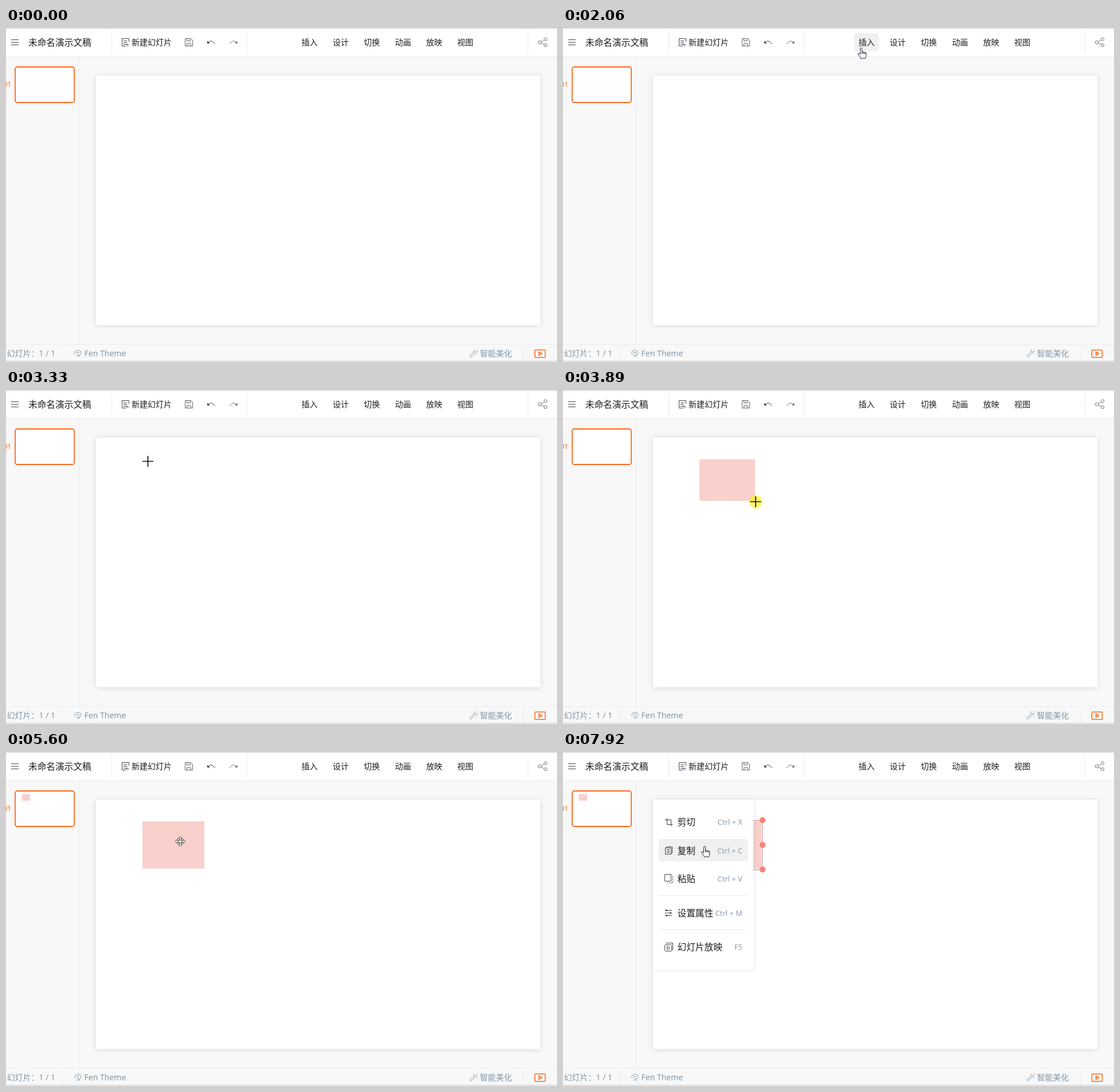
These frames come from a looping animation (961 px wide and 583 px high, 8000 ms). An HTML page:

```html
<!DOCTYPE html>
<html lang="zh-CN">
<head>
<meta charset="utf-8">
<title>演示文稿</title>
<style>
html, body { margin: 0; width: 100%; height: 100%; overflow: hidden; background: #f8f8f8; }
svg { display: block; width: 961px; height: 583px; }
text { font-family: "Noto Sans", "Noto Sans CJK SC", "Noto Sans CJK", sans-serif; font-size: 14px; fill: #1c1c1c; white-space: pre; }
.big { font-size: 15.7px; }
.key { font-size: 13px; fill: #8a9cae; text-anchor: end; }
.foot text { fill: #8297a8; }
.ico { fill: none; stroke: #444; }
.pale { stroke: #8c8c8c; }
.foot .ico { stroke: #8297a8; }
.orange { fill: none; stroke: #f9691c; stroke-width: 1.5; }
.thick { stroke-width: 2; }
.line { stroke: #ececec; fill: none; }
.card { fill: #fff; filter: drop-shadow(0 1px 5px rgba(0,0,0,.12)); }
.card.low { filter: drop-shadow(3px 3px 4px rgba(0,0,0,.06)); }
.hover { fill: #f0f0f0; }
.pink { fill: #f9d0cb; }
</style>
</head>
<body>
<svg viewBox="0 0 961 583">
  <defs>
    <g id="bend"><path d="M1 4Q7-3.500 13.500 6"/><path d="M0 .5V5H4.500Z" fill="#333" stroke="none"/></g>
    <path id="blade" d="M-1.300-1.300V-5H-3.500L0-8.500L3.500-5H1.300V-1.300"/>
  </defs>
  <rect width="961" height="49" fill="#fff"/>
  <path class="line" d="M0 49.500H961M127.500 50V552M0 552.500H961M184.500 5V45M420.500 5V45M910.500 5V45M97.500 556V580M902.500 556V580"/>
  <path d="M0 .5H961M0 581.500H961" stroke="#cfcfcf"/>

  <rect id="hoverNew" class="hover" x="193" y="9" width="103" height="31" rx="4"/>
  <rect id="hoverInsert" class="hover" x="508" y="9" width="43" height="31" rx="4"/>

  <text class="big" x="39" y="31">未命名演示文稿</text>
  <text x="219" y="30">新建幻灯片</text>
  <g id="bar" class="ico">
    <path d="M214.500 24V18.500H202.500V31.500H209"/>
    <path d="M209 29.500H215M212 26.500V32.500" stroke="#6d8fb5"/>
    <path d="M312.500 18.500H322.500L325.500 21.500V31.500H312.500ZM315.500 18.500V22.500H321.500V18.500M315.500 31.500V27.500H322.500V31.500" stroke="#6b6464"/>
    <use href="#bend" x="351" y="22"/>
    <use href="#bend" transform="matrix(-1 0 0 1 403.500 22)" opacity=".75"/>
    <g stroke="#777">
      <circle cx="931" cy="25" r="2.800"/><circle cx="941" cy="19.500" r="2.600"/><circle cx="941" cy="30" r="2.600"/>
      <path d="M938.500 21L934 24M934 26.500L938.500 29"/>
    </g>
  </g>
  <g id="tabs"></g>

  <rect class="card" x="157" y="83" width="775" height="435.500"/>
  <text x="-4.500" y="103" style="font-size:12px;fill:#f9691c">01</text>
  <rect x="16" y="68" width="103" height="62" rx="3.500" fill="#fff" stroke="#f9691c" stroke-width="1.800"/>
  <rect id="mini" class="pink" x="27.500" y="73.500" width="14.500" height="11.500"/>

  <g id="foot" class="foot">
    <text x="1.500" y="573">幻灯片：1 / 1</text>
    <text x="136.500" y="573">Fen Theme</text>
    <text x="826.500" y="573">智能美化</text>
    <path class="ico" d="M121 570Q118 565 123 563H128Q132 564 131 568.500Q129.500 571 126 570.500L124 568.500M123 566.500H128M123 572.500H129"/>
    <path class="ico" d="M809 572.500L817.500 564L819.500 566L811 574.500ZM816 561.500V564M820.500 562.500L822 561M820.500 568.500L822 570M820 565H823"/>
  </g>

  <rect id="box" class="pink" x="238" y="121"/>
  <g id="sel" fill="#f7837b"><rect x="236.500" y="119.500" width="111" height="86" fill="none" stroke="#c08780"/></g>

  <g id="menu">
    <rect class="card" x="403" y="55" width="252.500" height="427.500" rx="4"/>
    <g id="shapes" class="ico pale">
      <path class="thick" d="M422.500 80H440.500V97.500H422.500Z"/>
      <path class="thick" d="M422 128H431V123L440 131.500L431 140V135.500H422Z"/>
      <path d="M425.500 171V168.500H437.500V171M431.500 168.500V181.500M428.500 181.500H434.500" stroke-width="1.400"/>
      <path class="thick" d="M422.500 209L440.500 226"/>
      <path class="thick" d="M425 303.500H438" stroke-dasharray="2.500 2.700"/>
      <path d="M423.500 339V353.500H440M425 346L428.500 342.500L432 348L435 345L438.500 349.500"/>
      <path d="M424.500 383.500H438.500V396.500H424.500ZM429 387.500V396.500M434 387.500V396.500" stroke="#666"/>
      <path d="M431.500 427.500V425.500H424.500L428.500 432L424.500 438.500H431.500V436.500M433.500 431L438.500 438.500M438.500 431L433.500 438.500" stroke="#444"/>
    </g>
  </g>

  <g id="popup">
    <rect class="card low" x="157" y="83" width="175" height="296.500" rx="4"/>
    <rect class="hover" x="167" y="152" width="155.500" height="38.500" rx="4"/>
    <path class="line" d="M167 250.500H322M167 309.500H322"/>
    <g id="edit" class="ico">
      <path d="M181.500 115.500V126.500H191.500M177.500 118.500H188.500V129.500"/>
      <path d="M180.500 167V165.500H190.500V176.500H189M178.500 167.500H188.500V178.500H178.500Z"/>
      <path d="M177.500 213.500H188.500V225.500H177.500Z"/>
      <path d="M191.500 217V228.500H181.500" stroke-dasharray="2.500 1.500"/>
      <path class="thick" d="M180.500 275V278M187.500 279.500V282.500M180.500 284V287"/>
      <path d="M180.500 335V333.500H191.500V345H190"/>
    </g>
  </g>

  <g id="pointer">
    <circle id="press" r="11.800" fill="#fbf518" opacity=".62"/>
    <path id="arrow" fill="#fff" stroke="#111" d="M0 0V14L3.300 11L5.300 16L7.300 15L5.300 10.300H10Z"/>
    <path id="hand" fill="#fff" stroke="#1d2536" stroke-linejoin="round" d="M1.500 10V7q1.500-1 2.700.3V10V7.300q1.500-.8 2.500.5V10V7.800q1.600-.4 2 1.200V13q0 2-1.200 3.500V18H-1V16.500L-5.300 10.800q-.6-1.800 1.200-1.800L-1.500 11V1.200a1.500 1.500 0 0 1 3 0V7"/>
    <path id="cross" stroke="#111" stroke-width="1.700" d="M-9.500 0H9.500M0-9.500V9.500"/>
    <g id="move" fill="#fff" stroke="#222"><rect x="-1.300" y="-1.300" width="2.600" height="2.600" stroke="none"/></g>
  </g>
</svg>
<script>
const $ = id => document.getElementById(id);

function add(parent, tag, attrs, content) {
  const el = document.createElementNS("http://www.w3.org/2000/svg", tag);
  for (const name in attrs) el.setAttribute(name, attrs[name]);
  if (content) el.textContent = content;
  $(parent).append(el);
}

// evenly spaced horizontal strokes
function bars(parent, x, y, width, count, gap, attrs) {
  for (let i = 0; i < count; i++) add(parent, "path", { ...attrs, d: `M${x} ${y + i * gap}h${width}` });
}

// framed play sign
function play(parent, x, y, w, h, attrs) {
  const side = `M${x + w / 2 - 2} ${y + h / 2 - 3}l5 3l-5 3Z`;
  add(parent, "rect", { ...attrs, x, y, width: w, height: h, rx: 1 });
  add(parent, "path", { ...attrs, d: side });
}

bars("bar", 9, 20.5, 13, 3, 4.5);
bars("bar", 205, 22.5, 6, 3, 3);
bars("edit", 181, 170.5, 5, 3, 2.5);
bars("edit", 178, 276.5, 12, 3, 4.5);
bars("shapes", 424, 387.5, 15, 2, 4.5);
play("foot", 922.5, 562, 18, 13, { class: "orange" });
play("shapes", 424, 254.5, 15, 12, { stroke: "#444", "stroke-width": 1.3 });
play("edit", 177.5, 336.5, 12, 11);
for (let turn = 0; turn < 360; turn += 90) add("move", "use", { href: "#blade", transform: `rotate(${turn})` });

["插入", "设计", "切换", "动画", "放映", "视图"].forEach((label, i) =>
  add("tabs", "text", { x: 515.5 + i * 54.3, y: 30 }, label));

["矩形", "箭头", "文字", "线条", "多媒体", "其他类型", "统计图", "表格", "公式"].forEach((label, i) => {
  const y = 88.5 + i * 43;
  add("menu", "text", { x: 449, y: y + 5 }, label);
  if (i > 5) return;
  add("menu", "path", { class: "line", d: `M611.5 ${y - 19}v38` });
  add("menu", "path", { class: "ico pale", d: `M625 ${y - 6}l6.5 6l-6.5 6` });
});

// each divider pushes the rows below it down by 10
[["剪切", "Ctrl + X", 0], ["复制", "Ctrl + C", 0], ["粘贴", "Ctrl + V", 0],
 ["设置属性", "Ctrl + M", 1], ["幻灯片放映", "F5", 2]].forEach(([label, key, dividers], i) => {
  const y = 122 + i * 49.6 + dividers * 10;
  add("popup", "text", { class: "big", x: 199.5, y: y + 6 }, label);
  add("popup", "text", { class: "key", x: 313, y: y + 5 }, key);
});

for (const x of [236, 292, 348])
  for (const y of [119, 162, 205])
    if (x !== 292 || y !== 162) add("sel", "circle", { cx: x, cy: y, r: 5.2 });
add("sel", "circle", { cx: 292, cy: 88.5, r: 5.2 });

const LOOP = 8000, FRAME = 67, CLICK = 135;
const OPEN = 2330, PICK = 2980, DRAG = 3540, DROP = 4430, BLUR = 5200, SELECT = 6070, POPUP = 6870;
const releases = [OPEN, PICK, BLUR + CLICK, SELECT + CLICK, POPUP];
const enter = [1084, 723];

// the pointer eases from stop to stop: start ms, end ms, x, y
const stops = [
  [200, 410, 446, 255],
  [550, 1290, 290, 39],
  [1370, 2060, 520, 35],
  [2570, 2840, 480, 87],
  [3050, 3330, 247.5, 124.5],
  [3400, DRAG, 238, 121],
  [3610, 3890, 336, 195],
  [3960, 4200, 347, 205.5],
  [4700, 5100, 452, 205],
  [5400, 5600, 304, 156],
  [7730, 7920, 247, 165]
];

function place(t) {
  let at = enter;
  for (const [start, end, ...to] of stops) {
    if (t < start) break;
    const steps = Math.round((end - start) / FRAME) + 1;
    const step = Math.floor((t - start) / (end - start) * (steps - 1) + 0.01) + 1;
    const left = (1 - Math.min(1, step / steps)) ** 1.5;
    at = at.map((from, n) => to[n] + (from - to[n]) * left);
  }
  return at;
}

const within = (t, a, b) => t >= a && t < b;
const show = (id, on) => { $(id).style.display = on ? "" : "none"; };

function draw(t) {
  const [x, y] = place(t);
  const inside = (l, top, r, b) => x >= l && x <= r && y >= top && y <= b;
  const menu = within(t, OPEN, PICK);
  const popup = t >= POPUP;
  const dropped = t >= DROP;
  const onNew = inside(193, 9, 296, 40);
  const onInsert = inside(508, 9, 551, 40);

  show("box", t > DRAG);
  $("box").setAttribute("width", dropped ? 108 : Math.max(0, x - 239));
  $("box").setAttribute("height", dropped ? 82.5 : Math.max(0, y - 122.5));

  show("hoverNew", onNew);
  show("hoverInsert", onInsert || within(t, OPEN, PICK + FRAME));
  show("menu", menu);
  show("popup", popup);
  show("mini", dropped);
  show("sel", within(t, DROP, BLUR) || t >= SELECT);

  let kind = "arrow";
  if (popup || menu || onNew || onInsert) kind = "hand";
  else if (within(t, PICK, DROP)) kind = "cross";
  else if (dropped && inside(238, 121, 346, 204)) kind = "move";
  for (const id of ["arrow", "hand", "cross", "move"]) show(id, id === kind);
  show("press", within(t, DRAG, DROP) || releases.some(r => within(t, r - CLICK, r)));
  $("pointer").setAttribute("transform", `translate(${x} ${y})`);
}

const begin = performance.now();
function tick() {
  draw((performance.now() - begin) % LOOP);
  requestAnimationFrame(tick);
}
tick();
</script>
</body>
</html>
```
